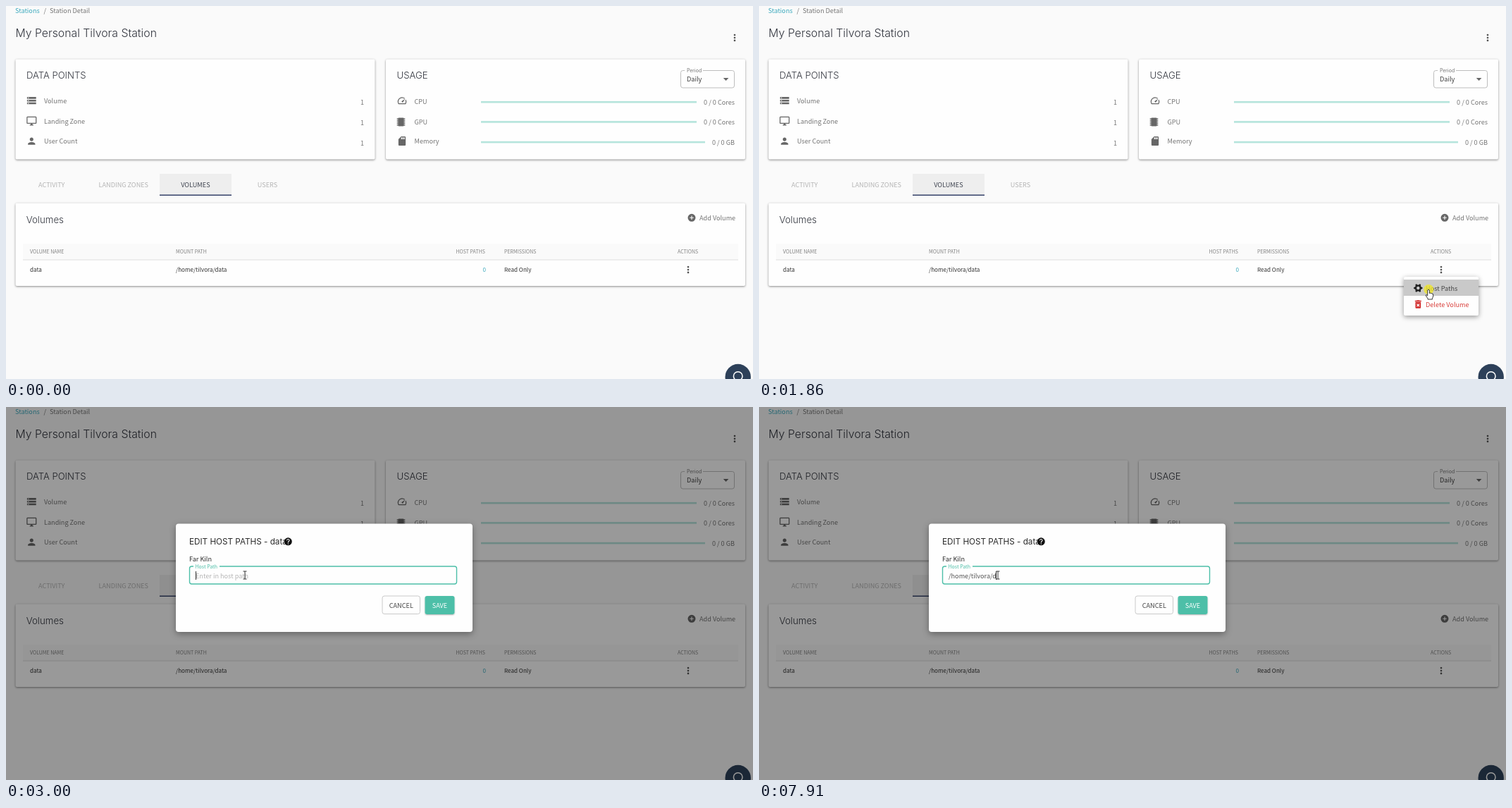
These frames come from a looping animation (1060 px wide and 529 px high, 8 s). An HTML page with a canvas:

```html
<!DOCTYPE html>
<html lang="en">
<head>
<meta charset="utf-8">
<title>Station Detail</title>
<style>
  html, body { margin: 0; width: 100%; height: 100%; overflow: hidden; background: #fafafa; }
  canvas { display: block; }
</style>
</head>
<body>
<canvas id="stage" width="1060" height="529"></canvas>
<script>
const ctx = document.getElementById('stage').getContext('2d');
const LOOP = 8000;
const SANS = '"Noto Sans CJK JP", "Noto Sans CJK SC", "Noto Sans CJK KR", "Noto Sans CJK", "Open Sans", sans-serif';
const HEAD = 'Inter, Lato, sans-serif';
const BODY = 9.15, CELL = 8.15, SMALL = 7;
const GRAY = '#757575', DARK = '#3c3c3c', TEAL = '#4dbfa8';
const PATH = '/home/tilvora/data';
const KEY_TIMES = [4330, 4880, 5110, 5180, 5880, 6050, 6360, 6440, 6520, 6600, 6750, 6980, 7060, 7360, 7910];

const ICONS = {
  storage: 'M2 20h20v-4H2v4zm2-3h2v2H4v-2zM2 4v4h20V4H2zm4 3H4V5h2v2zm-4 7h20v-4H2v4zm2-3h2v2H4v-2z',
  desktop: 'M21 2H3c-1.1 0-2 .9-2 2v12c0 1.1.9 2 2 2h7v2H8v2h8v-2h-2v-2h7c1.1 0 2-.9 2-2V4c0-1.1-.9-2-2-2zm0 14H3V4h18v12z',
  person: 'M12 12c2.21 0 4-1.79 4-4s-1.79-4-4-4-4 1.79-4 4 1.79 4 4 4zm0 2c-2.67 0-8 1.34-8 4v2h16v-2c0-2.66-5.33-4-8-4z',
  card: 'M18 2h-8L4 8v12c0 1.1.9 2 2 2h12c1.1 0 2-.9 2-2V4c0-1.1-.9-2-2-2zm-6 6h-2V4h2v4zm3 0h-2V4h2v4zm3 0h-2V4h2v4z',
  add: 'M12 2a10 10 0 1 0 0 20 10 10 0 1 0 0-20zm5 11h-4v4h-2v-4H7v-2h4V7h2v4h4v2z',
  help: 'M12 2a10 10 0 1 0 0 20 10 10 0 1 0 0-20zm1 17h-2v-2h2v2zm2.07-7.75l-.9.92C13.45 12.9 13 13.5 13 15h-2v-.5c0-1.1.45-2.1 1.17-2.83l1.24-1.26c.37-.36.59-.86.59-1.41 0-1.1-.9-2-2-2s-2 .9-2 2H8c0-2.21 1.79-4 4-4s4 1.79 4 4c0 .88-.36 1.68-.93 2.25z',
  trash: 'M6 19c0 1.1.9 2 2 2h8c1.1 0 2-.9 2-2V7H6v12zm2.46-7.12l1.41-1.41L12 12.59l2.12-2.12 1.41 1.41L13.41 14l2.12 2.12-1.41 1.41L12 15.41l-2.12 2.12-1.41-1.41L10.59 14l-2.13-2.12zM15.5 4l-1-1h-5l-1 1H5v2h14V4z'
};
for (const name in ICONS) ICONS[name] = new Path2D(ICONS[name]);

const ARROW = new Path2D('M0 0V11L2.6 8.6L4.2 12.4L5.8 11.7L4.2 8H7.6Z');
const HAND = new Path2D('M-1.3 1Q0-.8 1.3 1V5.5Q2.8 4.4 3.3 5.7Q4.6 4.9 5 6.2Q6.4 5.6 6.6 7V10L5.4 12.6V14H-1V12.8L-3.6 9Q-4.2 7.4-2.6 7.8L-1.3 9Z');
const BEAM = new Path2D('M-2.5-5.5H2.5M0-5.5V5.5M-2.5 5.5H2.5');

// y is the middle of the capital letters
function text(str, x, y, color = GRAY, size = BODY, align = 'left', family = SANS, weight = 400) {
  ctx.font = `${weight} ${size}px ${family}`;
  ctx.textAlign = align;
  ctx.fillStyle = color;
  ctx.fillText(str, x, y + size * 0.365);
}

function rect(x, y, w, h, color) {
  ctx.fillStyle = color;
  ctx.fillRect(x, y, w, h);
}

function box(x, y, w, h, r, fill, stroke, line = 1) {
  ctx.beginPath();
  ctx.roundRect(x, y, w, h, r);
  if (fill) { ctx.fillStyle = fill; ctx.fill(); }
  if (stroke) { ctx.strokeStyle = stroke; ctx.lineWidth = line; ctx.stroke(); }
}

function raised(x, y, w, h, r, blur, drop, alpha) {
  ctx.save();
  ctx.shadowColor = `rgba(0,0,0,${alpha})`;
  ctx.shadowBlur = blur;
  ctx.shadowOffsetY = drop;
  box(x, y, w, h, r, '#fefefe');
  ctx.restore();
}

function disc(x, y, r, color) {
  ctx.beginPath();
  ctx.arc(x, y, r, 0, 7);
  ctx.fillStyle = color;
  ctx.fill();
}

function icon(name, x, y, color = '#666', size = 15.4) {
  ctx.save();
  ctx.translate(x - size / 2, y - size / 2);
  ctx.scale(size / 24, size / 24);
  ctx.fillStyle = color;
  ctx.fill(ICONS[name], 'evenodd');
  ctx.restore();
}

function dots(x, y) {
  for (const dy of [-3.9, 0, 3.9]) disc(x, y + dy, 1.35, '#555');
}

function gauge(x, y) {
  ctx.strokeStyle = '#666';
  ctx.lineWidth = 1.3;
  ctx.lineJoin = 'round';
  ctx.beginPath();
  ctx.arc(x, y + 0.7, 5.7, Math.PI * 0.83, Math.PI * 1.72);
  ctx.moveTo(x + 5.1, y - 1.7);
  ctx.arc(x, y + 0.7, 5.7, -0.43, Math.PI * 0.17);
  ctx.lineTo(x - 5, y + 3.6);
  ctx.stroke();
  ctx.beginPath();
  ctx.moveTo(x + 4.6, y - 3.4);
  ctx.lineTo(x + 0.9, y + 2.1);
  ctx.lineTo(x - 0.9, y + 0.3);
  ctx.fillStyle = '#666';
  ctx.fill();
}

function chip(x, y) {
  box(x - 4, y - 6, 8, 12, 1, '#666');
  for (let i = -2; i <= 2; i++) rect(x - 5.8, y + i * 2.3 - 0.65, 11.6, 1.3, '#666');
}

function gear(x, y) {
  ctx.beginPath();
  for (let i = 0; i < 24; i++) {
    const r = i % 4 < 2 ? 6.3 : 4.6;
    const a = (i - 0.5) * Math.PI / 12;
    ctx.lineTo(x + r * Math.cos(a), y + r * Math.sin(a));
  }
  ctx.closePath();
  ctx.moveTo(x + 2.2, y);
  ctx.arc(x, y, 2.2, 0, 7);
  ctx.fillStyle = '#222';
  ctx.fill('evenodd');
}

function drawHeader() {
  text('Stations', 13, 7, '#3ba9bd');
  text('/', 53.5, 7);
  text('Station Detail', 62, 7);
  text('My Personal Tilvora Station', 13.5, 38.5, '#33363f', 15.8, 'left', HEAD, 300);
  dots(1034, 45);
}

function drawDataPoints() {
  raised(13.5, 75.5, 510, 142, 2, 3, 1, 0.45);
  text('DATA POINTS', 29, 98.5, '#33363f', 13.1, 'left', HEAD, 300);
  [['storage', 'Volume', 134.5], ['desktop', 'Landing Zone', 163.5], ['person', 'User Count', 192]].forEach(([name, label, y]) => {
    icon(name, 36.3, y - 0.3);
    text(label, 54, y);
    text('1', 508, y + 2.3, GRAY, BODY, 'right');
  });
}

function drawUsage() {
  raised(539, 75.5, 510, 142, 2, 3, 1, 0.45);
  text('USAGE', 554.5, 98.5, '#33363f', 13.2, 'left', HEAD, 300);
  box(957.5, 91.5, 76, 24.5, 3, null, '#bdbdbd');
  rect(963, 90, 26, 3, '#fefefe');
  text('Period', 966, 91.5, GRAY, SMALL);
  text('Daily', 966, 104, DARK);
  ctx.beginPath();
  ctx.moveTo(1017.8, 102);
  ctx.lineTo(1025.4, 102);
  ctx.lineTo(1021.6, 106);
  ctx.fillStyle = '#666';
  ctx.fill();
  gauge(562, 135);
  chip(560.5, 164.5);
  icon('card', 562, 191.5);
  [['CPU', 135.5, 136.5, '0 / 0 Cores', 980], ['GPU', 164.5, 164.7, '0 / 0 Cores', 980], ['Memory', 191.5, 193.4, '0 / 0 GB', 992]].forEach(([label, y, yValue, value, end]) => {
    text(label, 579.5, y);
    rect(674, yValue - 1.6, end - 674, 2.6, '#b5e4dc');
    text(value, 1034, yValue, GRAY, BODY, 'right');
  });
}

function drawTabs() {
  rect(218, 238, 102, 30, '#eeeeee');
  rect(218, 267.5, 102, 1.5, '#36436b');
  ['ACTIVITY', 'LANDING ZONES', 'VOLUMES', 'USERS'].forEach((label, i) =>
    text(label, 64.7 + i * 102.1, 254, i === 2 ? '#3f4450' : '#b4b4b4', BODY, 'center'));
}

function drawVolumes() {
  raised(13.5, 279.5, 1035.5, 117.5, 2, 3, 1, 0.45);
  text('Volumes', 28.7, 302.7, '#33363f', 13.3, 'left', HEAD, 300);
  icon('add', 973, 300.3, '#666', 13.2);
  text('Add Volume', 984, 300.5);
  rect(24, 337, 1015, 23, '#fafafa');
  rect(24, 359.5, 1015, 1, '#e0e0e0');
  [['VOLUME NAME', 34], ['MOUNT PATH', 241], ['HOST PATHS', 638.5], ['PERMISSIONS', 707], ['ACTIONS', 953]].forEach(([label, x]) =>
    text(label, x, 348, '#808080', SMALL));
  text('data', 34, 374, '#333', CELL);
  text(PATH, 241, 374, '#333', CELL);
  text('0', 681, 374, '#3ba9bd', CELL, 'right');
  text('Read Only', 707, 374, '#333', CELL);
  dots(968, 374);
}

function drawChatButton() {
  disc(1038.7, 526, 18.2, '#2d4059');
  ctx.strokeStyle = '#fff';
  ctx.lineWidth = 1.5;
  ctx.beginPath();
  ctx.arc(1038.7, 525, 6.3, 0, 7);
  ctx.moveTo(1042, 529.5);
  ctx.lineTo(1045.3, 531.5);
  ctx.stroke();
}

function drawMenu(alpha, hovered) {
  ctx.save();
  ctx.globalAlpha = alpha;
  raised(915, 384, 106, 55, 2, 7, 2, 0.4);
  if (hovered) rect(915, 388, 106, 23, '#c9c9c9');
  gear(935.3, 400);
  text('Host Paths', 946, 400.3, '#454545');
  icon('trash', 935.3, 423, '#d32f2f');
  text('Delete Volume', 946, 423.5, '#d9403c');
  ctx.restore();
}

function drawField(step, time) {
  const lift = Math.min(1, Math.max(0, (step - 34) / 3));
  const focused = step >= 35;
  const border = focused ? TEAL : step === 34 ? '#333' : '#c4c4c4';
  box(260.5, 226, 379, 25, 3, null, border, focused ? 1.4 : 1);
  if (focused) rect(266, 224.5, 37, 3, '#fefefe');

  const typed = PATH.slice(0, KEY_TIMES.filter(at => time >= at).length);
  if (focused && !typed) {
    ctx.globalAlpha = lift;
    text('Enter in host path', 269, 239.3, '#b4b4b4');
    ctx.globalAlpha = 1;
  }
  text('Host Path', 269 - lift * 0.5, 239.3 - lift * 13, focused ? TEAL : '#858585', BODY + (SMALL - BODY) * lift);
  text(typed, 269, 239.3, '#555');
  const blinkOff = (time >= 3380 && time < 3930) || (time >= 5650 && time < 5880);
  if (focused && !blinkOff) rect(Math.floor(269 + ctx.measureText(typed).width), 233, 1, 12, '#333');
}

function drawDialog(step, time) {
  raised(241, 165.5, 421, 153.5, 4, 10, 3, 0.35);
  text('EDIT HOST PATHS - data', 260, 191, '#2b2b2b', 11.7, 'left', HEAD);
  icon('help', 400.3, 190.8, '#111', 13.2);
  text('Far Kiln', 260, 216, '#2b2b2b');
  drawField(step, time);
  box(534, 268, 53.5, 25.5, 3, null, '#c9c9c9');
  text('CANCEL', 560.8, 281.5, '#444', BODY, 'center');
  raised(594.5, 268, 42, 26, 3, 2, 1, 0.3);
  box(594.5, 268, 42, 26, 3, TEAL);
  text('SAVE', 615.5, 281.5, '#fff', BODY, 'center');
}

// Pointer stops: [step, x, y]
const STOPS = [[0, 1027, 520], [8, 968, 371], [13, 968, 371], [19, 950, 402], [24, 950, 402], [33, 339, 238.5]];

function pointerAt(step) {
  let i = 0;
  while (i < STOPS.length - 2 && step >= STOPS[i + 1][0]) i++;
  const [s0, x0, y0] = STOPS[i];
  const [s1, x1, y1] = STOPS[i + 1];
  const u = Math.min(1, Math.max(0, (step - s0) / (s1 - s0)));
  const e = u * u * (3 - 2 * u);
  return { x: x0 + (x1 - x0) * e, y: y0 + (y1 - y0) * e };
}

function drawPointer(step, p) {
  const overDots = step < 23 && Math.hypot(p.x - 968, p.y - 373) < 9;
  const overItem = step > 13 && step < 23 && p.y > 388;
  const clicking = [10, 22, 34].includes(step);
  if (clicking) disc(p.x + 0.3, p.y, step === 22 ? 7 : 8, 'rgba(240,230,45,.8)');
  ctx.save();
  ctx.translate(p.x, p.y);
  ctx.strokeStyle = '#222';
  ctx.lineWidth = 0.9;
  ctx.lineJoin = 'round';
  if (step >= 33) {
    ctx.stroke(BEAM);
  } else {
    const shape = overDots || overItem ? HAND : ARROW;
    ctx.fillStyle = '#fff';
    ctx.fill(shape);
    ctx.stroke(shape);
  }
  ctx.restore();
}

function draw(time) {
  // The pointer and the panels advance on a 77 ms beat
  const step = Math.floor((time - 140) / 77);
  const p = pointerAt(step);
  rect(0, 0, 1060, 529, '#fafafa');
  drawHeader();
  drawDataPoints();
  drawUsage();
  drawTabs();
  drawVolumes();
  drawChatButton();
  if (step >= 11 && step < 25) drawMenu(Math.min(1, (step - 10) / 3), p.y > 388);
  if (step >= 23) {
    rect(0, 0, 1060, 529, 'rgba(0,0,0,.4)');
    drawDialog(step, time);
  }
  if (step >= 0) drawPointer(step, p);
}

const start = performance.now();
function tick() {
  draw((performance.now() - start) % LOOP);
  requestAnimationFrame(tick);
}
tick();
</script>
</body>
</html>
```
